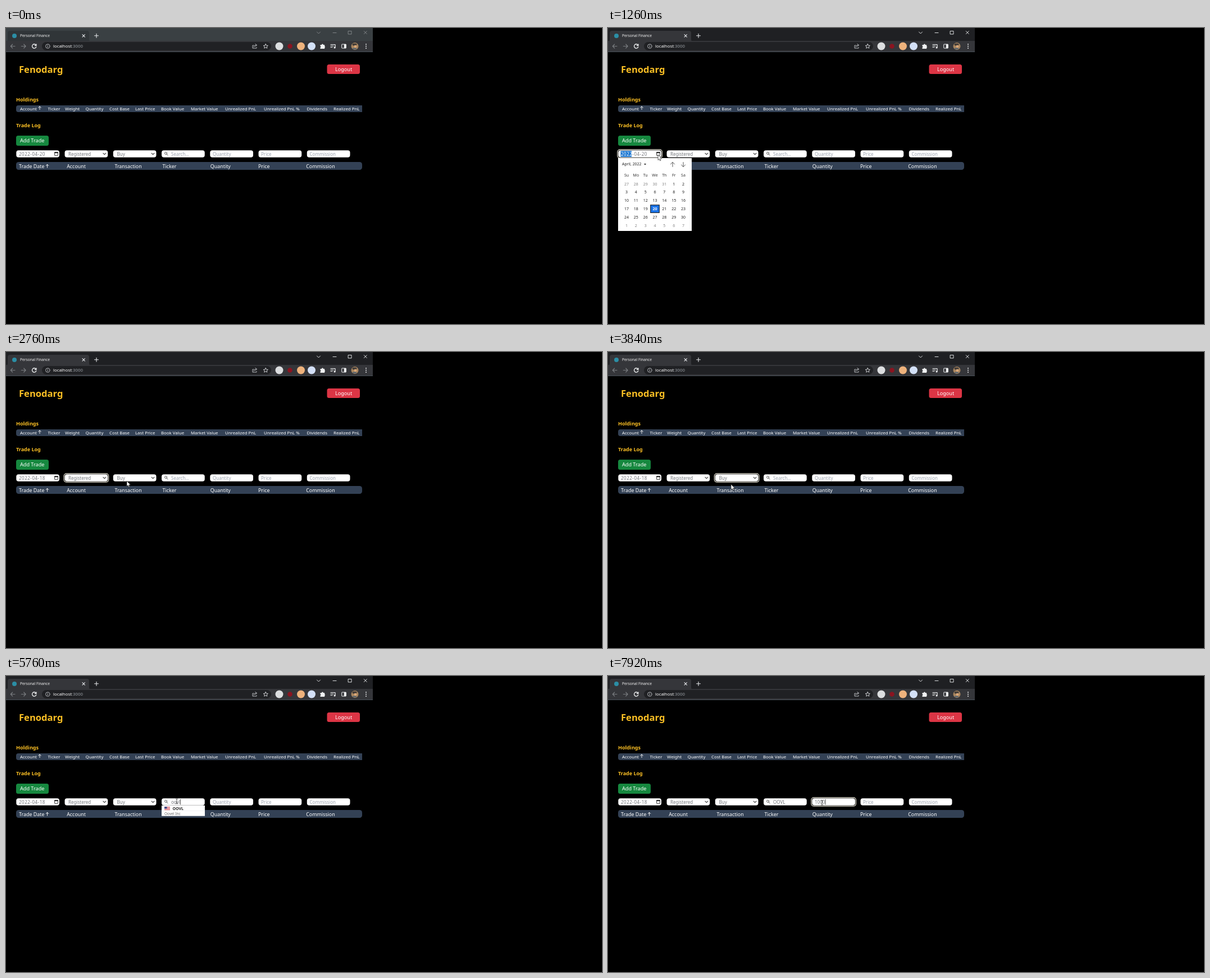
An HTML page that plays this animation: 1061x528 px, repeating every 8 s.

```html
<!DOCTYPE html>
<html lang="en">
<head>
<meta charset="utf-8">
<title>Personal Finance</title>
<style>
html, body { margin: 0; width: 100%; height: 100%; overflow: hidden; background: #000; }
svg { display: block; width: 100vw; height: 100vh; font-family: "Noto Sans", "Open Sans", sans-serif; }
text { white-space: pre; }
.line { fill: none; stroke-linecap: round; stroke-linejoin: round; }
</style>
</head>
<body>
<svg id="stage" viewBox="0 0 1061 528" preserveAspectRatio="none"></svg>
<script>
const LOOP = 8000, STEP = 60;
const stage = document.getElementById('stage');
const $ = id => document.getElementById(id);

// Markup helpers; text is centred vertically on y.
const label = (x, y, str, size = 8, fill = '#fff', weight = 400, extra = '') =>
  `<text x="${x}" y="${y + size * 0.36}" font-size="${size}" fill="${fill}" font-weight="${weight}" ${extra}>${str}</text>`;
const box = (x, y, w, h, fill, r = 0, extra = '') =>
  `<rect x="${x}" y="${y}" width="${w}" height="${h}" rx="${r}" fill="${fill}" ${extra}/>`;
const dot = (x, y, r, fill) => `<circle cx="${x}" cy="${y}" r="${r}" fill="${fill}"/>`;
const line = (d, stroke, width = 1, extra = '') =>
  `<path class="line" d="${d}" stroke="${stroke}" stroke-width="${width}" ${extra}/>`;
const group = (id, body) => `<g id="${id}">${body}</g>`;

const GREY = '#74777c', HINT = '#9ca3af', SLATE = '#334155', AMBER = '#fbbf24', ICON = '#dfe1e5';
const fieldX = i => 18 + i * 86.25;
const FIELD = { y: 218, w: 77.3, h: 13 };

function browser() {
  const y = 32.5;
  return box(0, 0, 653, 23.5, '#1f2023', 0, 'id="strip"') +
    `<path id="tab" d="M0 24Q3 24 3 20V9Q3 5 7 5H144Q148 5 148 9V20Q148 24 151 24Z" fill="#35363a"/>` +
    box(0, 23, 653, 19, '#35363a') + box(0, 42, 653, 1, '#485058') +
    dot(15, 14, 4, '#2b8ea5') + label(25, 14, 'Personal Finance', 6.65, '#f1f1f1') +
    line('M136 11.7l4.4 4.4M140.4 11.7l-4.4 4.4M161 10.3v7M157.5 13.8h7', '#e8eaed', 1.1) +
    group('controls', line('M553.5 7l3 3 3-3M582 8.5h6M609.5 5.5h5.5v5.5h-5.5zM637.3 5.6l5 5M642.3 5.6l-5 5', 'currentColor', 0.9)) +
    line('M16 32.5H8.5M11.7 29l-3.4 3.5 3.4 3.5M27.3 32.5h7.5M31.7 29l3.4 3.5-3.4 3.5', '#7b7e82', 1.1) +
    line('M53.4 30.5a3.7 3.7 0 1 0 .4 3M53.9 28.8v2.6h-2.6', '#f1f3f4', 1.3) +
    box(64, 25, 408, 15, '#202124', 7.5) +
    line('M78 32.5a3.7 3.7 0 1 1-7.4 0a3.7 3.7 0 1 1 7.4 0M74.3 32v2.2M74.3 30.4v.1', '#c4c7ca', 0.9) +
    label(84, y, 'localhost<tspan fill="#9aa0a6">:3000</tspan>', 7.8, '#fff') +
    line('M441 31h-2v5h7v-1.5M441 33.8q.5-3.2 4-3.2M443.8 28.5l3 2.1-3 2.2', ICON, 0.8) +
    line('M462.3 28.5l1.2 2.6 2.9.3-2.2 1.9.7 2.8-2.6-1.5-2.6 1.5.7-2.8-2.2-1.9 2.9-.3z', ICON, 0.9) +
    dot(486.5, y, 7, '#dcdee0') + dot(505.5, y, 4.3, '#8a1420') +
    dot(525, y, 7, '#eeb27c') + dot(544, y, 7, '#d3e0f7') +
    `<path d="M559.5 30h2.5a1.4 1.4 0 0 1 2.8 0h2.4v2.5a1.4 1.4 0 0 1 0 2.6v2h-7.7v-2.3a1.3 1.3 0 0 0 0-2.5z" fill="#f1f3f4"/>` +
    line('M578 29.5h8M578 32h5M578 34.5h3M586 30v5', '#f1f3f4', 1.2) + dot(585, 35, 1.5, '#f1f3f4') +
    box(597.7, 29, 7.6, 7, 'none', 0.5, 'stroke="#f1f3f4"') + box(601.8, 29, 3.5, 7, '#f1f3f4') +
    dot(621, y, 6.5, '#a9865f') + box(616.5, 27.5, 8, 4, '#403b38', 2) + dot(622, 33, 2.4, '#d9a779') + box(617, 35.5, 7, 2.5, '#5b6670', 1.2) +
    [29, 32.5, 36].map(cy => dot(641, cy, 0.95, '#f1f3f4')).join('');
}

function page() {
  const holdings = [[25, 'Account'], [74.5, 'Ticker'], [105, 'Weight'], [141.5, 'Quantity'], [184, 'Cost Base'],
    [230, 'Last Price'], [276, 'Book Value'], [329, 'Market Value'], [390, 'Unrealized PnL'],
    [459, 'Unrealized PnL %'], [535.5, 'Dividends'], [583, 'Realized PnL']];
  const trades = ['Trade Date', 'Account', 'Transaction', 'Ticker', 'Quantity', 'Price', 'Commission'];
  const upArrow = (x, y) => line(`M${x} ${y + 3}v-5.5m-2.4 2.2l2.4-2.4 2.4 2.4`, '#fff', 0.9);
  return label(23, 74, 'Fenodarg', 16.6, AMBER, 700) +
    box(571.5, 65, 58.5, 17, '#dc3545', 3.5) + label(586, 73.5, 'Logout', 9.1, '#fff', 500) +
    label(18, 128, 'Holdings', 9.1, AMBER, 700) +
    `<path d="M634 138V150H22Q18 150 18 146V142Q18 138 22 138Z" fill="${SLATE}"/>` +
    holdings.map(([x, s]) => label(x, 144, s, 7.85, '#fff', 500)).join('') + upArrow(60, 142.5) +
    label(18, 174, 'Trade Log', 9, AMBER, 700) +
    box(18, 192, 58, 18, '#16883f', 3.5) + label(25, 201, 'Add Trade', 9.1, '#fff', 500) +
    box(18, 239, 616, 14, SLATE, 4.5) +
    trades.map((s, i) => label(23 + i * 85.2, 246.3, s, 8.9, '#fff', 500)).join('') + upArrow(73.5, 246);
}

function fields() {
  const { y, w, h } = FIELD, mid = 224.7;
  const chevron = i => line(`M${fieldX(i) + 68.7} 223.3l2.4 2.4 2.4-2.4`, '#333', 1.1);
  return group('ring', box(-1.7, -1.7, w + 3.4, h + 3.4, '#f5f1e2', 5) + box(-0.6, -0.6, w + 1.2, h + 1.2, '#000', 4)) +
    [0, 1, 2, 3, 4, 5, 6].map(i => box(fieldX(i) + 0.3, y + 0.2, w - 0.6, h - 0.4, '#fff', 4)).join('') +
    box(22.5, 219.3, 19.5, 10.6, '#1976d2', 0, 'id="yearMark"') +
    label(23, mid, '<tspan id="year">2022</tspan>-04-<tspan id="day">20</tspan>', 8, GREY, 400, 'letter-spacing=".5"') +
    box(86.6, 221.8, 5.8, 5.6, 'none', 0.4, 'stroke="#222" stroke-width=".9"') + box(86.2, 221.2, 6.6, 2, '#222') +
    label(111, mid, 'Registered', 8, GREY) + chevron(1) +
    label(197.5, mid, 'Buy', 8, GREY) + chevron(2) +
    line('M286.6 223.4a2 2 0 1 1-4 0a2 2 0 1 1 4 0M286.1 225l2 2', '#444', 0.9) +
    label(294, mid, '', 8, GREY, 400, 'id="search"') +
    label(368, mid, '', 8, GREY, 400, 'id="quantity"') +
    label(454, mid, 'Price', 8, HINT) + label(540.5, mid, 'Commission', 8, HINT) +
    box(0, 219.8, 0.8, 9.6, '#222', 0, 'id="caret"');
}

function calendar() {
  const col = i => 33 + i * 16.83;
  const mid = 'text-anchor="middle"';
  let out = box(18, 232, 131, 130, '#fff') + label(25, 243, 'April, 2022', 6.9, '#222', 500) +
    '<path d="M64 242h4l-2 2.4z" fill="#222"/>' +
    line('M115 247.5v-8m-3.6 3.5l3.6-3.6 3.6 3.6M134 239.5v8m-3.6-3.5l3.6 3.6 3.6-3.6', '#444', 0.9);
  ['Su', 'Mo', 'Tu', 'We', 'Th', 'Fr', 'Sa'].forEach((d, i) => out += label(col(i), 262.7, d, 7, '#333', 400, mid));
  out += box(75.7, 315.7, 15.6, 13.8, '#1a73e8', 0, 'stroke="#222" stroke-width="1.1"');
  for (let n = 0; n < 42; n++) {
    const day = n - 4, shown = day < 1 ? day + 31 : day > 30 ? day - 30 : day;
    const picked = day === 20;
    const fill = picked ? '#fff' : shown === day ? '#222' : '#858585';
    out += label(col(n % 7), 278 + Math.floor(n / 7) * 14.9, shown, 7, fill, picked ? 700 : 400, mid);
  }
  return out;
}

function options(x, names) {
  return box(x, 232, FIELD.w, names.length * 10.6 + 0.4, '#fff') +
    names.map((s, i) => (i ? '' : box(x, 232, FIELD.w, 10.6, '#1e73d2')) +
      label(x + 7, 237.4 + i * 10.6, s, 8, i ? '#444' : '#fff')).join('');
}

const flags = {
  ca: y => box(282, y, 10, 6, '#fff') + box(282, y, 2.7, 6, '#e0202c') + box(289.3, y, 2.7, 6, '#e0202c') +
    `<path d="M287 ${y + 1}l1.6 2-1.6 2-1.6-2z" fill="#e0202c"/>`,
  us: y => box(282, y, 10, 6, '#fff') + [0, 1.7, 3.4, 5.1].map(d => box(282, y + d, 10, 0.9, '#d64550')).join('') +
    box(282, y, 4.6, 3.4, '#3c4a86')
};

function results(items) {
  let y = 231, body = '';
  for (const [flag, ticker, ...lines] of items) {
    body += flags[flag](y + 2.2) + label(296.5, y + 5.2, ticker, 7, '#222', 700) +
      box(277, y + 9.5, 77, 0.5, '#e4e6ea') +
      lines.map((s, i) => label(282, y + 14.2 + i * 8.7, s, 6.55, '#666')).join('');
    y += 10 + lines.length * 8.65;
    body += box(277, y - 0.4, 77, 0.6, '#d5d8dd');
  }
  return box(277, 231, 77, y - 231, '#fff') + body;
}

stage.innerHTML = box(0, 0, 1061, 528, '#000') + browser() + page() + fields() +
  group('calendar', calendar()) +
  group('accountMenu', options(fieldX(1), ['Registered', 'Non-Registered'])) +
  group('sideMenu', options(fieldX(2), ['Buy', 'Sell', 'Dividend'])) +
  group('manyResults', results([
    ['ca', 'OOK.TO', 'Oorvelle', 'International Inc'],
    ['ca', 'OOD.Q.V', 'OODelvane Capital', 'Corp'],
    ['ca', 'OOM.V', 'Oomberath Silver Ltd'],
    ['ca', 'OOLQ.V', 'Oolvane Lithium', 'Corp'],
    ['ca', 'OON.V', 'Oont Resources Inc']])) +
  group('oneResult', results([['us', 'OOVL', 'Oovel Inc']])) +
  group('arrow', '<path d="M0 0V9.6L2.1 7.7 3.5 10.8 5.1 10.1 3.7 7.1H6.6Z" fill="#fff" stroke="#222" stroke-width=".7"/>') +
  group('beam', line('M-1.5-4.5Q0-4.5 0-3.5V3.5Q0 4.5-1.5 4.5M1.5-4.5Q0-4.5 0-3.5M0 3.5Q0 4.5 1.5 4.5', '#333', 0.8));

// Pointer path: time, x, y
const path = [[0, 140, 352], [60, 134, 345], [420, 100, 262], [600, 100, 262], [900, 89, 226], [1260, 89, 226],
  [1380, 73, 268], [1620, 48, 320], [1860, 48, 320], [2160, 146, 226], [2280, 146, 226], [2400, 148, 236],
  [2520, 150, 236], [2760, 215, 230], [3120, 219, 236], [3840, 219, 236], [4140, 304, 223.5], [6000, 304, 223.5],
  [6240, 300, 239], [6660, 300, 239], [7080, 381, 226], [8000, 381, 226]];

// Value tables: time, value; each value holds until the next time
const searchText = [[0, ''], [4500, 'o'], [4620, 'oo'], [5400, 'oov'], [5520, 'oovl'], [6300, 'OOVL']];
const quantityText = [[0, ''], [7500, '1'], [7620, '10'], [7740, '100'], [7860, '1000']];
const focus = [[0, -1], [960, 0], [2220, 1], [2940, 2], [4200, 3], [6300, -1], [7140, 4]];
const spans = { calendar: [1080, 1860], accountMenu: [2280, 2520], sideMenu: [3000, 3540],
  manyResults: [4260, 5640], oneResult: [5640, 6300], yearMark: [960, 1860] };

const at = (table, t) => table.filter(row => row[0] <= t).pop();
const show = (id, on) => $(id).setAttribute('visibility', on ? 'visible' : 'hidden');

function pointer(t) {
  const i = Math.max(1, path.findIndex(p => p[0] > t));
  const [t0, x0, y0] = path[i - 1], [t1, x1, y1] = path[i];
  const k = (t - t0) / (t1 - t0), e = k * k * (3 - 2 * k);
  return [x0 + (x1 - x0) * e, y0 + (y1 - y0) * e];
}

function setInput(id, text, hint) {
  $(id).textContent = text || hint;
  $(id).setAttribute('fill', text ? GREY : HINT);
}

function render(t) {
  for (const id in spans) show(id, t >= spans[id][0] && t < spans[id][1]);

  const active = t >= 900;
  $('strip').setAttribute('fill', active ? '#1f2023' : '#3a4043');
  $('tab').setAttribute('fill', active ? '#35363a' : '#303538');
  $('controls').setAttribute('color', active ? '#f1f3f4' : '#878b8e');
  $('year').setAttribute('fill', t >= 960 && t < 1860 ? '#fff' : GREY);
  $('day').textContent = t < 1860 ? '20' : '18';

  const [searchTime, search] = at(searchText, t), [quantityTime, quantity] = at(quantityText, t);
  setInput('search', search, 'Search...');
  setInput('quantity', quantity, 'Quantity');

  const [focusTime, field] = at(focus, t);
  show('ring', field >= 0 && field !== 3);
  $('ring').setAttribute('transform', `translate(${fieldX(Math.max(0, field))} ${FIELD.y})`);

  const typing = field === 3 || field === 4;
  const lastKey = Math.max(focusTime, field === 3 ? searchTime : quantityTime);
  show('caret', typing && (t - lastKey) % 1000 < 500);
  if (typing) {
    const id = field === 3 ? 'search' : 'quantity', value = field === 3 ? search : quantity;
    $('caret').setAttribute('x', (field === 3 ? 294 : 368) + (value ? $(id).getComputedTextLength() + 0.3 : 0));
  }

  const [x, y] = pointer(t);
  const overText = y > 218 && y < 231 && x > 277 && x < 440;
  for (const id of ['arrow', 'beam']) $(id).setAttribute('transform', `translate(${x} ${y})`);
  show('arrow', t >= 60 && !overText);
  show('beam', overText);
}

const start = performance.now();
function tick() {
  const t = (performance.now() - start) % LOOP;
  render(Math.floor(t / STEP) * STEP);
  requestAnimationFrame(tick);
}
tick();
</script>
</body>
</html>
```
